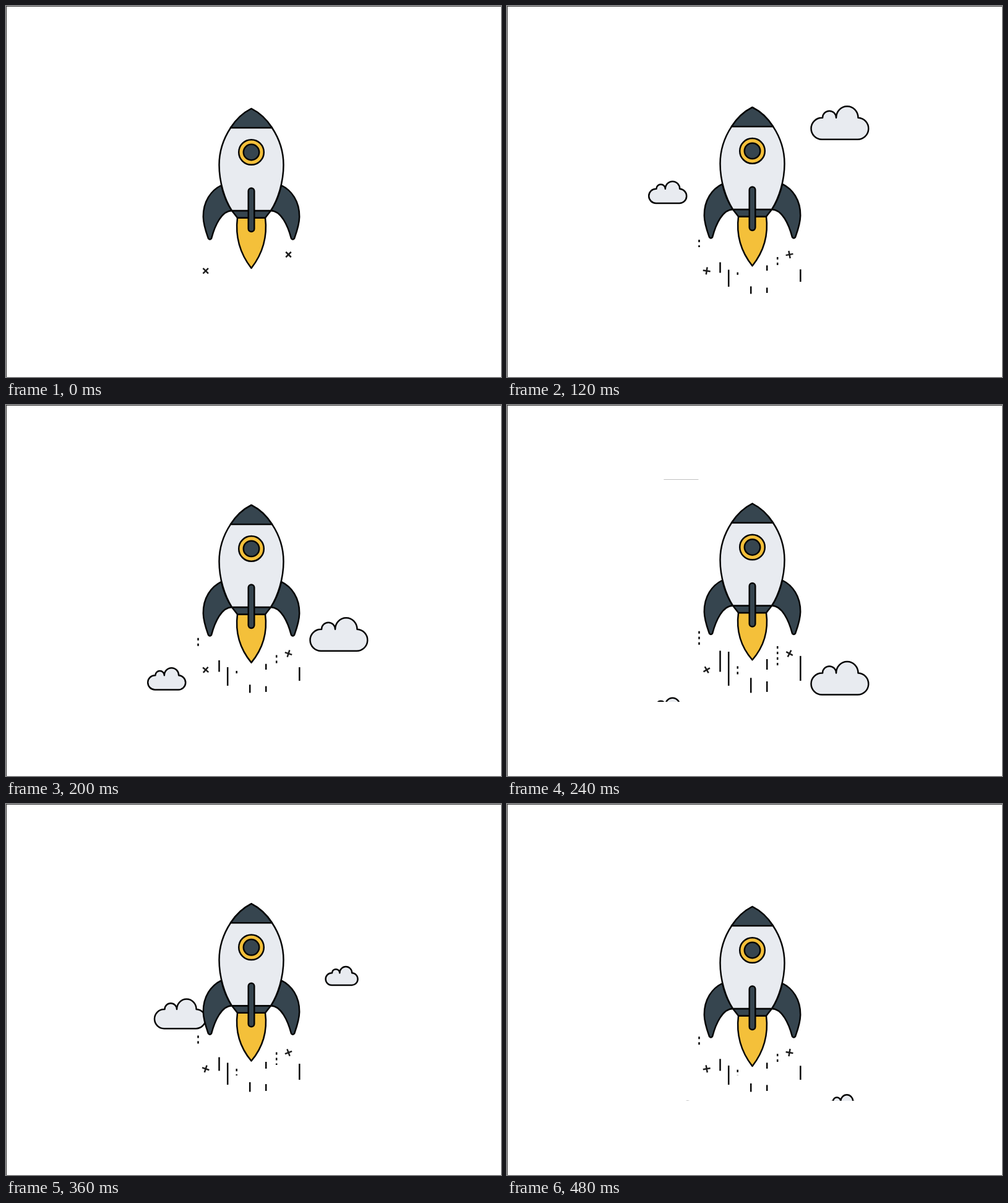
These frames come from a looping animation (800x600 px, 520 ms). An HTML page with a canvas:

```html
<!DOCTYPE html>
<html lang="en">
<head>
<meta charset="utf-8">
<title>Rocket</title>
<style>
html, body { margin: 0; overflow: hidden; background: #fff; }
canvas { display: block; }
</style>
</head>
<body>
<canvas id="stage" width="800" height="600"></canvas>
<script>
const ctx = document.getElementById('stage').getContext('2d');
const INK = '#050505', SLATE = '#36454f', PALE = '#e8ebf0', YELLOW = '#f4c03a';
const LOOP = 520, STEP = 40, KEY = 80;

// Values every 80 ms
const lift = [0, -2.5, -1.7, -6.5, -5.7, -3.7, 0];
const streakSize = [0, 50, 5, 55, 11, 60, 31];
const sparks = [
  { x: 322.7, y: 428.3, turn: [45, 87, 110, 150, 177, 220, 260] },
  { x: 456.5, y: 402, turn: [45, 60, 98, 118, 150, 168, 190] }
];
// x, bottom, relative length, dashed
const streaks = [
  [310.5, 390, .44, 1], [344.5, 431.5, .62, 0], [358.2, 454, 1, 0], [372.7, 439, .3, 1],
  [394.2, 465.5, .44, 0], [420.2, 428, .31, 0], [420.2, 464, .31, 0],
  [437.2, 422, .58, 1], [474.3, 446, .73, 0]
];
const clouds = [
  { x: 229.2, y: 226, scale: .658, start: 80, speed: 171, drag: 29.5 },
  { x: 491.5, y: 313.5, scale: 1, start: 160, speed: 155, drag: 27 },
  { x: 240, y: 290.5, scale: .89, start: 320, speed: 136.5, drag: 17.5 },
  { x: 516.6, y: 223.3, scale: .56, start: 320, speed: 139, drag: .5 }
];

const cloudShape = new Path2D('M17.5 0a17.5 17.5 0 0 1 0-35h1a11 11 0 0 1 22 0a17.75 18.5 0 0 1 35.5 0A17.5 17.5 0 0 1 74.5 0Z');
// Rocket parts are centred on x = 0
const body = new Path2D('M0 166Q20 176 33.5 197C46 216 52 236 52 257C52 285 43 313 31.5 331H-31.5C-43 313-52 285-52 257C-52 236-46 216-33.5 197Q-20 176 0 166Z');
const nose = new Path2D('M0 166Q20 176 33.5 197H-33.5Q-20 176 0 166Z');
const nozzle = new Path2D('M-31.5 331H31.5L22.5 342.5H-22.5Z');
const fin = new Path2D('M48.5 290C65 298 78 316 77.7 341C77.5 354 73 366 69.5 376Q67 379 64.5 376C59 355 48 331 31.5 331C40 318 45.5 304 48.5 290Z');

function at(keys, t) {
  const k = t / KEY, i = Math.floor(k), a = keys[i];
  return a + ((keys[i + 1] ?? a) - a) * (k - i);
}

function shape(path, fill) {
  ctx.fillStyle = fill;
  ctx.fill(path);
  ctx.stroke(path);
}

function disc(y, r, fill) {
  const path = new Path2D();
  path.arc(0, y, r, 0, 7);
  shape(path, fill);
}

function line(x1, y1, x2, y2) {
  ctx.beginPath();
  ctx.moveTo(x1, y1);
  ctx.lineTo(x2, y2);
  ctx.stroke();
}

function drawCloud(c, t) {
  const m = Math.min((t - c.start) / KEY, 2.5);
  ctx.save();
  ctx.translate(c.x, c.y + c.speed * m - c.drag * m * (m - 1));
  ctx.scale(c.scale, c.scale);
  ctx.lineWidth = 2.5 / c.scale;
  shape(cloudShape, PALE);
  ctx.restore();
}

function drawRocket(dy) {
  ctx.save();
  ctx.translate(396.5, dy);
  const tip = 424 + .8 * dy, mid = 342.5 + (tip - 342.5) * .5;
  shape(new Path2D(`M-22.5 342.5H22.5C26 ${mid - 12} 20 ${mid + 15} 0 ${tip}C-20 ${mid + 15}-26 ${mid - 12}-22.5 342.5Z`), YELLOW);
  for (const side of [-1, 1]) {
    ctx.save();
    ctx.scale(side, 1);
    shape(fin, SLATE);
    ctx.restore();
  }
  shape(nozzle, SLATE);
  shape(body, PALE);
  shape(nose, SLATE);
  disc(236.5, 20.3, YELLOW);
  disc(236.5, 12.7, SLATE);
  const strip = new Path2D();
  strip.roundRect(-4.8, 294.5, 9.6, 70.5, 4.8);
  shape(strip, SLATE);
  ctx.restore();
}

function draw(t) {
  ctx.fillStyle = '#fff';
  ctx.fillRect(0, 0, 800, 600);
  ctx.fillStyle = '#333';
  ctx.fillRect(0, 0, 800, 1);
  ctx.fillRect(0, 0, 1, 600);

  ctx.save();
  ctx.beginPath();
  ctx.rect(200, 120, 400, 360);
  ctx.clip();
  ctx.strokeStyle = INK;
  ctx.lineWidth = 2.5;
  ctx.lineJoin = 'round';
  for (const c of clouds) drawCloud(c, t);

  const size = at(streakSize, t);
  for (const [x, bottom, ratio, dashed] of streaks) {
    ctx.setLineDash(dashed ? [4, 5] : []);
    if (size) line(x, bottom - size * ratio, x, bottom);
  }
  ctx.setLineDash([]);

  drawRocket(at(lift, t));

  ctx.strokeStyle = '#1c1c1c';
  for (const s of sparks) {
    ctx.save();
    ctx.translate(s.x, s.y);
    ctx.rotate(at(s.turn, t) * Math.PI / 180);
    line(-6, 0, 6, 0);
    line(0, -6, 0, 6);
    ctx.restore();
  }
  ctx.restore();
}

function tick() {
  const t = performance.now() % LOOP;
  draw(Math.floor(t / STEP) * STEP);
  requestAnimationFrame(tick);
}
tick();
</script>
</body>
</html>
```
